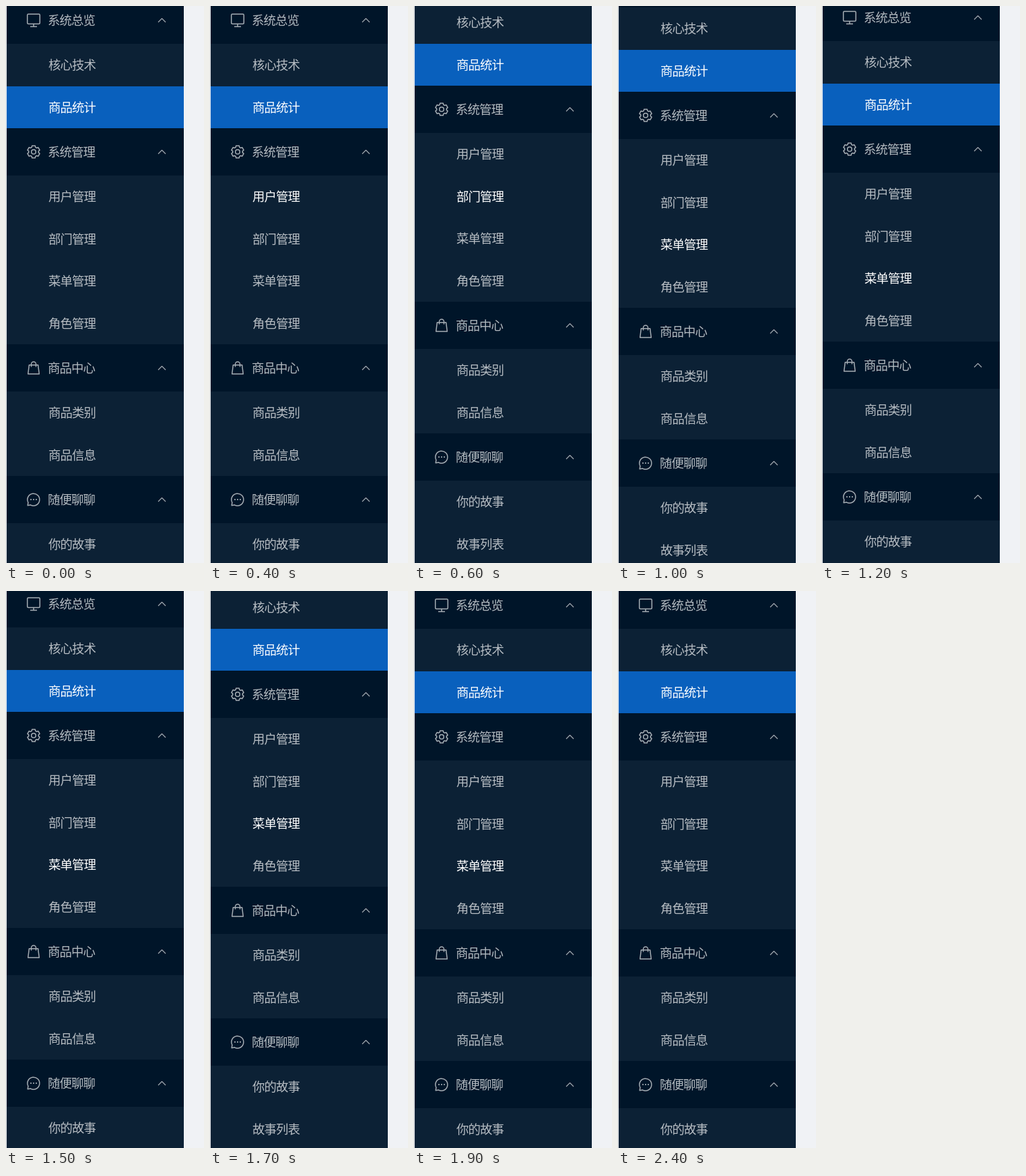
Write an HTML page that moves like this. It is 294x825 px and loops after 2.8 s.

```html
<!DOCTYPE html>
<html lang="zh-CN">
<head>
<meta charset="utf-8">
<style>
  html, body { margin: 0; width: 100%; height: 100%; overflow: hidden; background: #f0f2f5; }
  #side { position: absolute; left: 1px; top: 0; width: 263px; height: 825px; overflow: hidden; background: #0c2135; }
  #menu { position: absolute; left: 0; top: -14px; width: 100%; letter-spacing: -.9px;
    font: 18.4px "Noto Sans CJK SC", "Noto Sans CJK", sans-serif; color: rgba(255,255,255,.7); white-space: nowrap; }
  .head { position: relative; height: 70px; line-height: 68px; padding-left: 61px; background: #001529; }
  .item { height: 62.5px; line-height: 60.5px; padding-left: 62px; }
  .active { background: #0960bd; color: #fff; }
  .hover { color: #fff; }
  svg { position: absolute; left: 0; top: 0; fill: none; stroke: #a6adb4; stroke-width: 1.5; stroke-linejoin: round; }
  .dots { stroke-width: 2.2; stroke-linecap: round; }
  .arrow { stroke-width: 1.1; }
</style>
</head>
<body>
<div id="side"><div id="menu"></div></div>
<script>
// Six-toothed gear outline around (40, 35)
function gear() {
  const points = [];
  for (let tooth = 0; tooth < 6; tooth++)
    for (const [turn, r] of [[-23, 7.3], [-14, 9.4], [14, 9.4], [23, 7.3]]) {
      const a = (30 + tooth * 60 + turn) * Math.PI / 180;
      points.push((40 + r * Math.cos(a)).toFixed(2) + ' ' + (35 + r * Math.sin(a)).toFixed(2));
    }
  return `<path d="M${points.join('L')}Z"/><circle cx="40" cy="35" r="3.3"/>`;
}

const icons = {
  screen: '<rect x="30.7" y="26" width="18.6" height="14.5" rx="1.5"/><path d="M40 40.5v4M35 44.5h10"/>',
  gear: gear(),
  bag: '<path d="M33.4 30.7h13.2l1.7 13.3h-16.6zM36.5 33.5v-4a3.5 3.5 0 0 1 7 0v4"/>',
  chat: '<path d="M35.6 43.1a9 9 0 1 0-3.7-3.7l-.7 4.4z"/><path class="dots" d="M36 35h.01M40 35h.01M44 35h.01"/>'
};

const groups = [
  ['系统总览', 'screen', '核心技术', '商品统计'],
  ['系统管理', 'gear', '用户管理', '部门管理', '菜单管理', '角色管理'],
  ['商品中心', 'bag', '商品类别', '商品信息'],
  ['随便聊聊', 'chat', '你的故事', '故事列表']
];

const menu = document.getElementById('menu');
menu.innerHTML = groups.map(([title, icon, ...items]) =>
  `<div class="head">${title}<svg width="263" height="70">${icons[icon]}` +
  '<path class="arrow" d="M225 38l5.5-5.5 5.5 5.5"/></svg></div>' +
  items.map(text => `<div class="item">${text}</div>`).join('')).join('');

const rows = [...menu.querySelectorAll('.item')];
rows[1].classList.add('active');
const USER = 2, DEPT = 3, LIST = 4, NONE = -1;

// [start ms, scroll distance, hovered row]
const steps = [
  [0, 0, NONE], [300, 0, DEPT], [400, 0, USER], [500, 10, USER],
  [600, 63, DEPT], [700, 20, DEPT], [800, 0, LIST], [900, 2, LIST],
  [1000, 54, LIST], [1100, 63, LIST], [1200, 4, LIST], [1300, 0, LIST],
  [1400, 1, LIST], [1500, 2, LIST], [1600, 55, LIST], [1700, 63, LIST],
  [1800, 15, LIST], [1900, 0, LIST], [2300, 0, USER], [2400, 0, NONE]
];

const start = performance.now();
function draw() {
  const t = (performance.now() - start) % 2800;
  const [, scroll, hovered] = steps.filter(step => step[0] <= t).pop();
  menu.style.top = -14 - scroll + 'px';
  rows.forEach((row, i) => row.classList.toggle('hover', i === hovered));
  requestAnimationFrame(draw);
}
draw();
</script>
</body>
</html>
```
